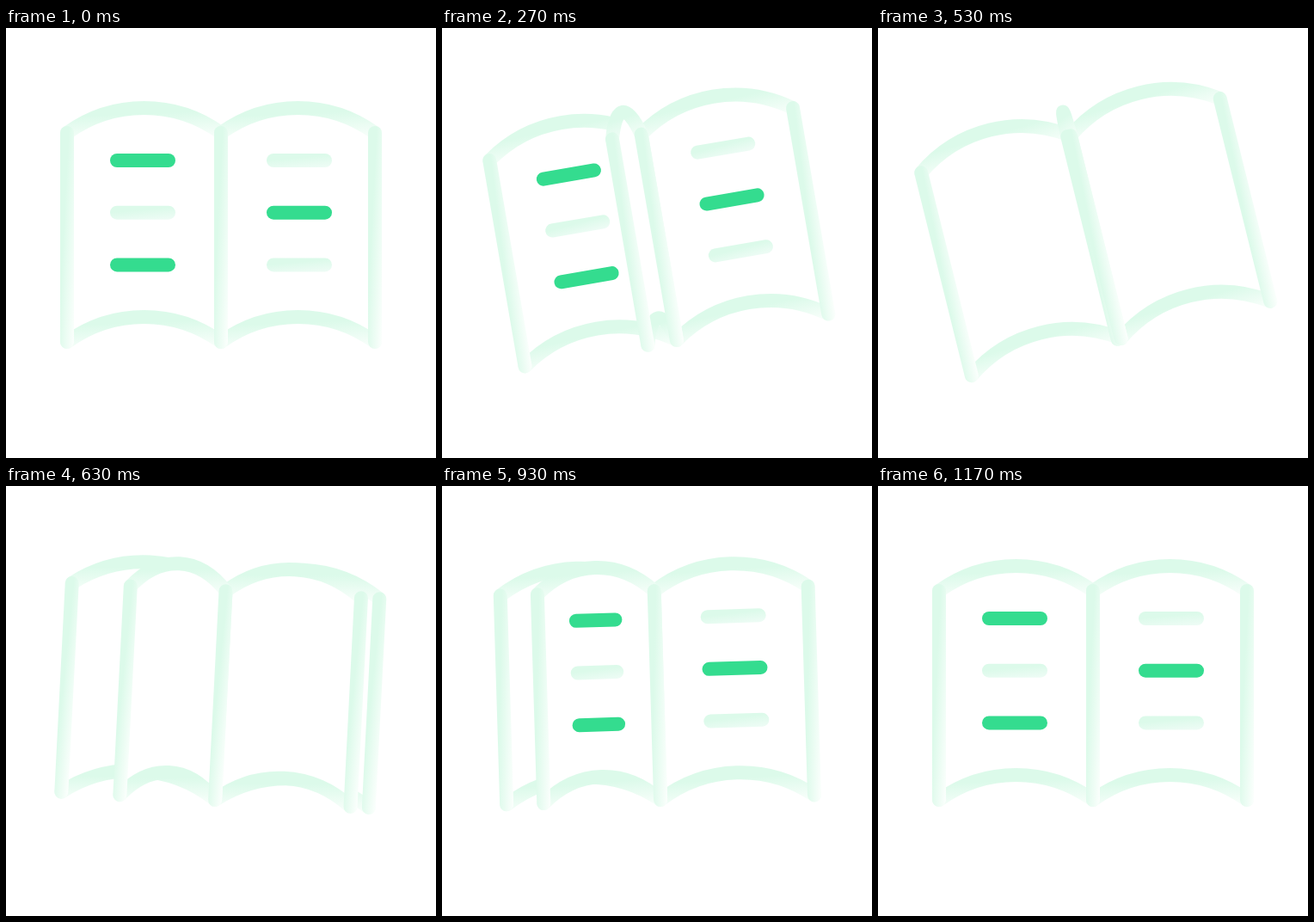
Animation, 500 px wide and 500 px high, one loop 1510 ms. Source, as an HTML page with a canvas:

```html
<!DOCTYPE html>
<html lang="en">
<head>
<meta charset="utf-8">
<title>Turning pages</title>
<style>
  html, body { margin: 0; width: 100%; height: 100%; overflow: hidden; background: #fff; }
  canvas { display: block; width: 100vw; height: 100vh; }
</style>
</head>
<body>
<canvas id="stage" width="500" height="500"></canvas>
<script>
const ctx = document.getElementById('stage').getContext('2d');

const LOOP = 1510, STEP = 100 / 3, LAST_STEP = 35;
const PIVOT = { x: 250, y: 230 };
const WIDTH = 179, TOP = -108, BOTTOM = 135, BULGE = 38.7, STROKE = 16;
const GREEN = '#34dc8f', MINT = '#dcfaea', PALE = '#effcf6', FADED = '#fcfffd';

// Tilt in degrees at each key time
const TILT = [[0, 0], [490, -17.2], [660, 4.2], [730, 4.5], [900, -2.2], [1060, 2.3], [1167, 0]];
const TURN = 486;
const LEAVES = [
  { start: -6, front: true, back: false },
  { start: 287, front: true, back: false },
  { start: 557, front: false, back: true }
];

const clamp = v => Math.min(1, Math.max(0, v));
const ease = v => (1 - Math.cos(Math.PI * v)) / 2;

function tiltAt(t) {
  for (let i = 1; i < TILT.length; i++) {
    const [t0, a] = TILT[i - 1], [t1, b] = TILT[i];
    if (t <= t1) return a + (b - a) * ease((t - t0) / (t1 - t0));
  }
  return 0;
}

// Fade over a stroke's box; across and down are the shares of each direction
function fade(x0, y0, x1, y1, across, down, end) {
  const half = STROKE / 2;
  const left = Math.min(x0, x1) - half, top = Math.min(y0, y1) - half;
  const gx = across / (Math.abs(x1 - x0) + STROKE);
  const gy = down / (Math.abs(y1 - y0) + STROKE);
  const n = gx * gx + gy * gy;
  const g = ctx.createLinearGradient(left, top, left + gx / n, top + gy / n);
  g.addColorStop(0, MINT);
  g.addColorStop(0.35, MINT);
  g.addColorStop(1, end);
  return g;
}

function line(x0, y0, x1, y1, style) {
  ctx.strokeStyle = style;
  ctx.beginPath();
  ctx.moveTo(x0, y0);
  ctx.lineTo(x1, y1);
  ctx.stroke();
}

function arcTo(from, to, y) {
  const d = (to - from) * 0.3;
  ctx.bezierCurveTo(from + d, y - BULGE, to - d, y - BULGE, to, y);
}

function edgeArc(w, y) {
  ctx.strokeStyle = fade(0, y - 29, w, y, 0.15, 0.85, FADED);
  ctx.beginPath();
  ctx.moveTo(0, y);
  arcTo(0, w, y);
  ctx.stroke();
}

function edgeLine(x) {
  line(x, TOP, x, BOTTOM, fade(x, TOP, x, BOTTOM, 0.55, 0.45, FADED));
}

// scale runs from 1 (flat on the right) to -1 (flat on the left)
function drawPage(scale, withBars) {
  const w = WIDTH * scale;
  ctx.fillStyle = '#fff';
  ctx.beginPath();
  ctx.moveTo(0, TOP);
  arcTo(0, w, TOP);
  ctx.lineTo(w, BOTTOM);
  arcTo(w, 0, BOTTOM);
  ctx.fill();

  edgeArc(w, TOP);
  edgeArc(w, BOTTOM);
  edgeLine(w);
  edgeLine(0);

  if (!withBars) return;
  for (let row = 0; row < 3; row++) {
    const y = -76 + row * 60.7, x0 = 61 * scale, x1 = 121 * scale;
    const isGreen = (row === 1) === (scale > 0);
    line(x0, y, x1, y, isGreen ? GREEN : fade(x0, y, x1, y, 0.3, 0.7, PALE));
  }
}

function draw(t) {
  const progress = LEAVES.map(leaf => clamp((t - leaf.start) / TURN));
  const [first, second, third] = progress;
  const moving = LEAVES
    .map((leaf, i) => ({ leaf, p: progress[i], scale: Math.cos(Math.PI * progress[i]) }))
    .filter(m => m.p > 0 && m.p < 1 && t > 0);

  ctx.setTransform(1, 0, 0, 1, 0, 0);
  ctx.fillStyle = '#fff';
  ctx.fillRect(0, 0, 500, 500);
  ctx.translate(PIVOT.x, PIVOT.y);
  ctx.rotate(tiltAt(t) * Math.PI / 180);
  ctx.lineWidth = STROKE;
  ctx.lineCap = ctx.lineJoin = 'round';

  drawPage(-1, first < 1 || third >= 1);
  drawPage(1, second <= 0 || third > 0);

  // Later leaves lie lower on the right and higher on the left
  const right = moving.filter(m => m.scale >= 0).reverse();
  const left = moving.filter(m => m.scale < 0);
  for (const { leaf, scale } of [...right, ...left]) {
    drawPage(scale, scale >= 0 ? leaf.front : leaf.back);
  }
}

function tick() {
  const t = performance.now() % LOOP;
  draw(Math.min(LAST_STEP, Math.floor((t + 4) / STEP)) * STEP);
  requestAnimationFrame(tick);
}
tick();
</script>
</body>
</html>
```
